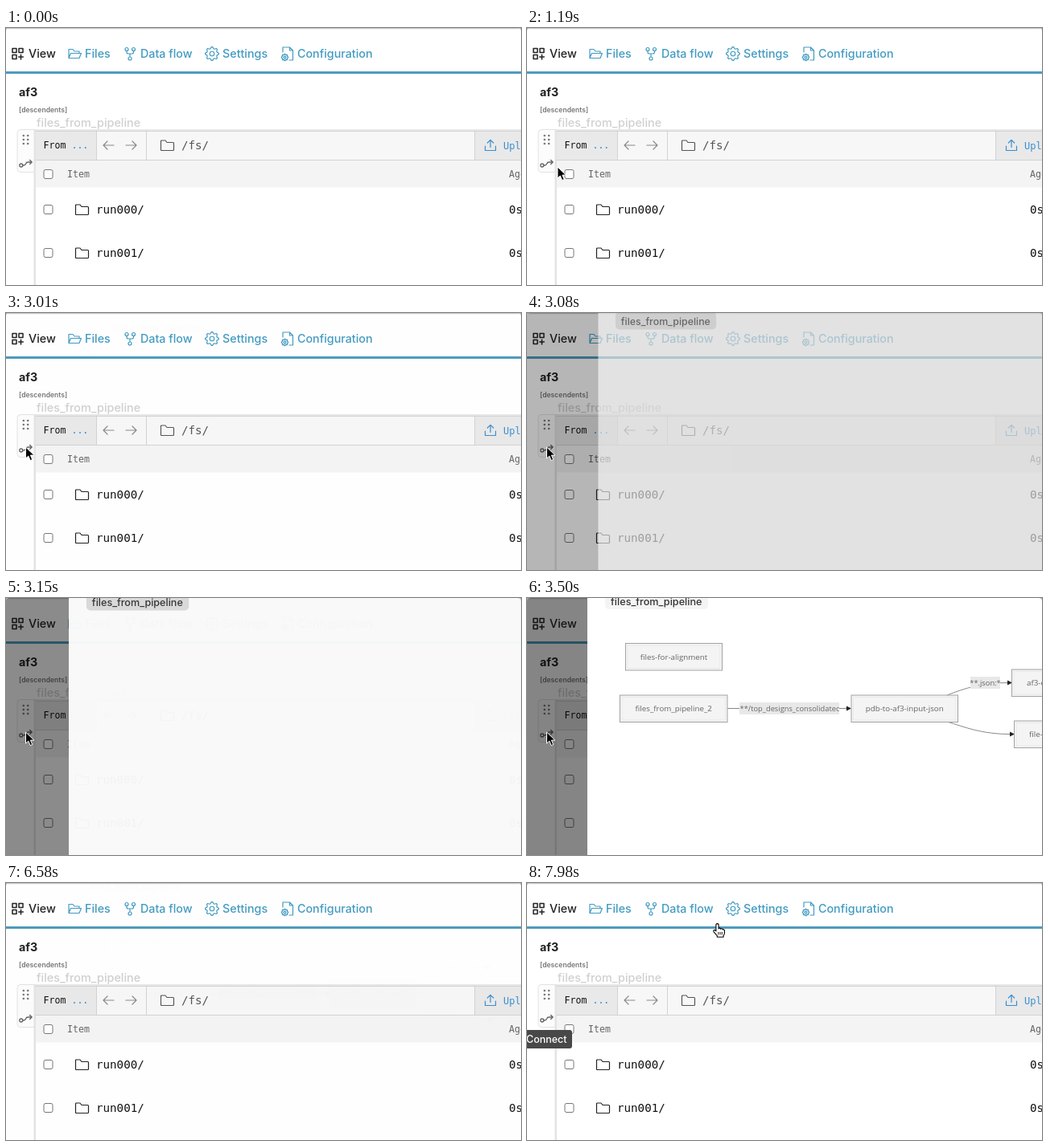
An HTML page for the animation above (8 s loop, 640 px wide and 320 px high).

```html
<!DOCTYPE html>
<html lang="en">
<head>
<meta charset="utf-8">
<title>Pipeline files</title>
<style>
  html, body { margin: 0; width: 100%; height: 100%; overflow: hidden; background: #aaa; }
  svg { display: block; width: 100vw; height: 100vh; }
  text { font-family: Inter, "Open Sans", sans-serif; white-space: pre; }
  .tab { font-size: 14.3px; font-weight: 500; }
  .mono { font-family: "DejaVu Sans Mono", "Liberation Mono", monospace; }
  .node { font-family: "Open Sans", "Noto Sans", sans-serif; font-size: 9.75px; fill: #666; }
  .edge { font-size: 9.3px; }
  .line { fill: none; stroke-linecap: round; stroke-linejoin: round; }
</style>
</head>
<body>
<svg viewBox="0 0 640 320" preserveAspectRatio="none">
  <defs>
    <clipPath id="frame"><rect width="640" height="330" rx="4"/></clipPath>
    <clipPath id="label"><rect x="264" y="128" width="124" height="20"/></clipPath>
  </defs>
  <g clip-path="url(#frame)">
    <g id="page"></g>
    <g id="tip">
      <rect x="-8" y="183" width="64" height="23" rx="3" fill="#484848"/>
      <text x="-1" y="199" font-size="12.5" font-weight="500" fill="#fff">Connect</text>
    </g>
    <rect id="shade" width="640" height="320" fill="#000"/>
    <g id="modal">
      <rect x="75" y="-40" width="1200" height="680" fill="#fff"/>
      <rect id="tag" x="97" y="-8" width="128" height="22" rx="5"/>
      <text x="104" y="8.5" font-size="12.65" font-weight="500" fill="#333">files_from_pipeline</text>
      <g id="graph"></g>
    </g>
    <circle id="ring" fill="none" stroke="#000" stroke-width="1.5"/>
    <g id="cursor" stroke="#fff" stroke-linejoin="round">
      <path id="arrow" fill="#000" stroke-width="1"
        d="M0 0V14L3.3 11 5.7 16.6 8.2 15.5 5.9 10.1H10.4Z"/>
      <g id="hand">
        <path fill="#fff" stroke="#000" stroke-width="1.1"
          d="M-1.6 9V1.2Q-1.6 -.4 0 -.4T1.6 1.2V6Q1.8 5 3 5.1T4.3 6.4Q4.6 5.6 5.7 5.8T6.8 7.2Q7.2 6.6 8.2 7T9 8.4V11Q9 13 7.6 14.4V16.2H-.2V14.6L-4.4 9.8Q-5.2 8.4 -4.2 7.7T-2.2 8.2Z"/>
        <path fill="none" stroke="#000" stroke-width=".9" d="M1.4 10V13.4M3.6 10V13.4M5.8 10V13.4"/>
      </g>
    </g>
  </g>
</svg>
<script>
const $ = id => document.getElementById(id);
const BLUE = '#429bc2', STEP = 70, LOOP = 8000;

const rect = (x, y, w, h, fill, more = '') =>
  `<rect x="${x}" y="${y}" width="${w}" height="${h}" fill="${fill}" ${more}/>`;
const text = (x, y, s, fill, more = '') => `<text x="${x}" y="${y}" fill="${fill}" ${more}>${s}</text>`;
const mono = (x, y, s, fill, size) => text(x, y, s, fill, `class="mono" font-size="${size}"`);
const line = (d, color, width = 1.2, at = '0 0') =>
  `<path class="line" d="${d}" stroke="${color}" stroke-width="${width}" transform="translate(${at})"/>`;
const box = y => rect(47, y - 5.5, 11, 11, '#fff', 'rx="2" stroke="#777"');

const folder = (x, y, color) =>
  line('M0 12V1.5Q0 .5 1 .5H5.5L7.5 3H15Q16 3 16 4V12Q16 13 15 13H1Q0 13 0 12Z', color, 1.2, `${x} ${y}`);

function gear(cx, cy, r) {
  const pts = Array.from({ length: 32 }, (_, i) => {
    const a = (i - .5) * Math.PI / 16, k = i % 4 < 2 ? r : r * .78;
    return `${(cx + k * Math.cos(a)).toFixed(2)} ${(cy + k * Math.sin(a)).toFixed(2)}`;
  });
  const q = r * .33;
  return line(`M${pts.join('L')}Z`, BLUE) +
    line(`M${-q} 0a${q} ${q} 0 1 0 ${2 * q} 0a${q} ${q} 0 1 0 ${-2 * q} 0`, BLUE, 1.2, `${cx} ${cy}`);
}

function buildPage() {
  const tab = (x, s, fill = BLUE) => text(x, 37, s, fill, 'class="tab"');
  let s = rect(0, 0, 640, 320, '#fff') + rect(0, 0, 640, 1.2, '#c4c4c4');

  s += line('M8 25.5h5v5h-5zM16 25.5h5v5h-5zM8 33.5h5v5h-5zM18.5 33.3v5.6M15.7 36.1h5.6', '#222', 1.5);
  s += line('M1 12.5V1.5H6L8 4H14V6.5M1 12.5L3.5 6.5H16.5L14 12.5Z', BLUE, 1.2, '77 25');
  s += line('M148 26.5a2 2 0 1 0 4 0a2 2 0 1 0 -4 0M156.5 26.5a2 2 0 1 0 4 0a2 2 0 1 0 -4 0' +
    'M152 38a2 2 0 1 0 4 0a2 2 0 1 0 -4 0M150 28.5V30Q150 32 152 32H156.5Q158.5 32 158.5 30V28.5M154 32V36', BLUE);
  s += gear(256, 32, 8.4);
  s += line('M344 30V24H352.5L356.5 28V40H352M352.5 24V28H356.5', BLUE) + gear(346.5, 36.5, 4.2);
  s += tab(28, 'View', '#222') + tab(98, 'Files') + tab(167, 'Data flow') +
    tab(269, 'Settings') + tab(362, 'Configuration');
  s += rect(0, 54, 640, 3, '#4d9bbd');

  s += text(16, 85, 'af3', '#222', 'font-size="14.3" font-weight="700"');
  s += text(16, 105, '[descendents]', '#777', 'font-size="8.6" font-weight="600"');
  s += text(38, 122.5, 'files_from_pipeline', '#d0d0d0', 'font-size="14.4" font-weight="500"');

  // side handle
  s += rect(14, 126.5, 24, 53, '#fcfcfc', 'rx="4" stroke="#e2e2e2"');
  for (const x of [21.8, 27.2]) for (const y of [134, 139, 144])
    s += `<circle cx="${x}" cy="${y}" r="1.3" fill="#777"/>`;
  s += line('M16.8 171a2 2 0 1 0 4 0a2 2 0 1 0 -4 0M20.8 171H22Q24 171 24.6 169T27.5 167H32M29.6 164.5L32.2 167L29.6 169.5',
    '#666', 1.3);

  // file table
  s += rect(34.5, 126, 2.5, 194, '#e4e4e4') + rect(37, 126, 603, 2, '#e8e8e8');
  s += rect(37, 128, 603, 36, '#f7f7f7') + rect(37, 128, 75, 36, '#e9e9e9') + rect(582, 128, 58, 36, '#e9e9e9');
  s += line('M37 128.5H640M37 164.5H640M112.5 128V164M174.5 128V164M582.5 128V164', '#d2d2d2', 1);
  s += rect(37, 165, 603, 33.5, '#f4f4f4');
  s += text(46.5, 150, 'From <tspan fill="#3182ce">...</tspan>', '#111', 'class="mono" font-size="11.6"');
  s += line('M134 146H121M126 141L121 146L126 151M149 146H162M157 141L162 146L157 151', '#8a8a8a');
  s += folder(192.5, 139.5, '#555') + mono(218, 151, '/fs/', '#555', 14.2);
  s += line('M595.5 147V152.5H608.5V147M602 148.5V139.5M598.3 143L602 139.3L605.7 143', '#3a8fd0');
  s += mono(618, 150.5, 'Upload', '#3a8fd0', 12);
  s += box(182) + mono(76, 186, 'Item', '#666', 11.6) + mono(625, 186, 'Age', '#666', 11.6);
  ['run000/', 'run001/'].forEach((name, i) => {
    const y = 226 + 54 * i;
    s += box(y) + folder(86.5, y - 6.5, '#222') + mono(112, y + 5, name, '#111', 14.2) + mono(625, y + 5, '0s', '#111', 14.2);
  });
  return s;
}

function buildGraph() {
  const node = (x, y, w, name, tx) =>
    rect(x, y, w, 33.5, '#f4f4f4', 'stroke="#a2a2a2"') +
    rect(x + 2.5, y + 2.5, w - 5, 28.5, 'none', 'stroke="#e9e9e9"') +
    text(tx ?? x + w / 2, y + 20.2, name, '#666', `class="node" text-anchor="${tx ? 'start' : 'middle'}"`);
  const head = (x, y) => `<path d="M${x} ${y}l-6 -3v6z" fill="#222"/>`;
  let s = line('M249 137.5H398M522 121C545 112 565 105.5 598 105.5M522 154C545 161 565 169.5 600 169.5', '#888', 1);
  s += head(403, 137.5) + head(603, 105.5) + head(606, 169.5);
  s += rect(264, 130, 124, 15, '#e8e8e8') + rect(551, 98, 37, 15, '#e8e8e8');
  s += '<g clip-path="url(#label)">' +
    text(264.5, 141, '**/top_designs_consolidated', '#666', 'class="node edge"') + '</g>';
  s += text(569.5, 109, '**.json:*', '#666', 'class="node edge" text-anchor="middle"');
  s += node(122.5, 56.5, 120, 'files-for-alignment') + node(115.5, 121, 133.5, 'files_from_pipeline_2');
  s += node(403, 121, 132.5, 'pdb-to-af3-input-json');
  s += node(602.5, 89, 130, 'af3-c', 621) + node(605.5, 153, 130, 'file-', 624);
  return s;
}

const smooth = k => k * k * (3 - 2 * k);
const slow = k => 1 - (1 - k) ** 2;
const even = k => k;
const hold = () => 0;

// start time, x, y, easing towards the next row; null x hides the pointer
const path = [
  [0, null], [140, 219, 312, even], [210, 202.5, 299.5, hold], [280, 202.5, 299.5, smooth],
  [1120, 39.5, 175.5, even], [1190, 38, 173, slow], [1540, 24.5, 167, hold],
  [5110, 629, 89, hold], [5180, null], [7280, 626, 196, even], [7490, 402, 112, hold],
  [7560, 402, 112, smooth], [7980, 236.5, 51, hold]
];
// time, opacity, growth of the dialog
const dialog = [
  [0, 0, 0], [3010, .01, 0], [3080, .6, .55], [3150, .95, .9], [3220, .99, .98],
  [3290, 1, 1], [6580, .01, 1], [6650, 0, 0]
];
// time, radius, opacity of the click ring
const clicks = [
  [0, 0, 0], [1680, 22, .3], [1750, 0, 0], [2660, 22, .35], [2730, 28, .28], [2800, 31, .15], [2870, 0, 0]
];
const tooltip = [[0, 0], [7770, .4], [7840, .85], [7910, 1]];

const at = (rows, t) => rows.findLast(r => r[0] <= t);

function pointer(t) {
  const i = path.findLastIndex(r => r[0] <= t);
  const [t0, x, y, ease] = path[i], next = path[i + 1];
  if (x == null) return null;
  const k = next ? ease((t - t0) / (next[0] - t0)) : 0;
  return k ? [x + (next[1] - x) * k, y + (next[2] - y) * k] : [x, y];
}

function draw(t) {
  const p = pointer(t), show = (id, on) => $(id).setAttribute('visibility', on ? 'visible' : 'hidden');
  show('cursor', p);
  if (p) {
    const pointing = (t >= 2520 && t < 2870) || (t > 7560 && p[1] < 58);
    $('cursor').setAttribute('transform', `translate(${p})`);
    show('arrow', !pointing);
    show('hand', pointing);
  } else {
    show('arrow', false);
    show('hand', false);
  }

  const [, r, alpha] = at(clicks, t);
  const ring = $('ring');
  ring.setAttribute('cx', 24.5);
  ring.setAttribute('cy', 167);
  ring.setAttribute('r', r);
  ring.setAttribute('opacity', alpha);

  const [, fade, grow] = at(dialog, t);
  $('shade').setAttribute('opacity', .48 * fade);
  $('modal').setAttribute('opacity', fade);
  $('modal').setAttribute('transform', `translate(675 300) scale(${.95 + .05 * grow}) translate(-675 -300)`);
  $('tag').setAttribute('fill', grow < .95 ? '#dedede' : '#f4f4f4');
  show('graph', t >= 3500 && t < 6650);
  $('tip').setAttribute('opacity', at(tooltip, t)[1]);
}

$('page').innerHTML = buildPage();
$('graph').innerHTML = buildGraph();

const start = performance.now();
function tick() {
  const t = (performance.now() - start) % LOOP;
  draw(Math.floor(t / STEP) * STEP);
  requestAnimationFrame(tick);
}
tick();
</script>
</body>
</html>
```
